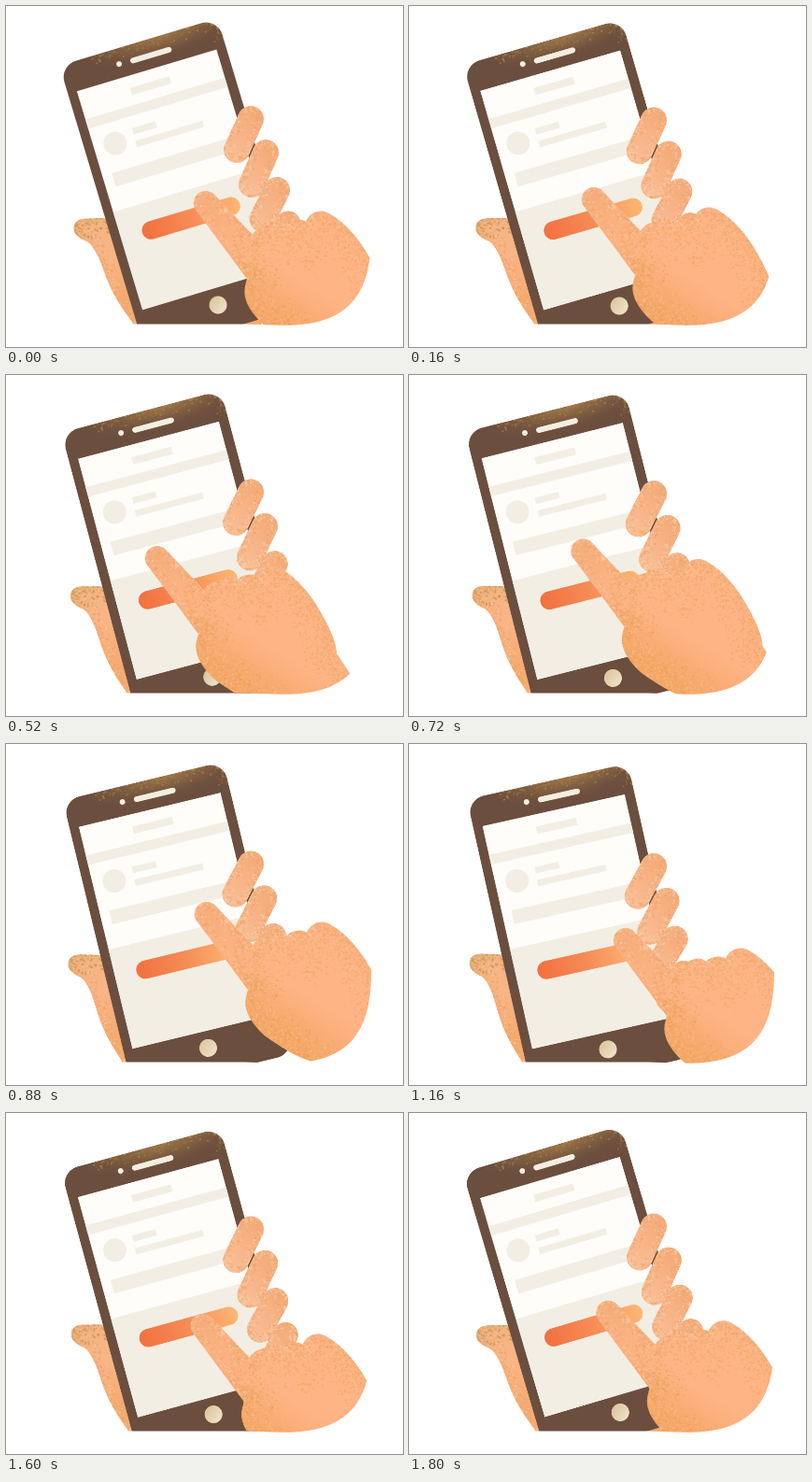
These frames come from a looping animation (425 px wide and 365 px high, 1840 ms). An HTML page with a canvas:

```html
<!DOCTYPE html>
<html lang="en">
<head>
<meta charset="utf-8">
<title>Tapping on a phone</title>
<style>
html, body { margin: 0; width: 100%; height: 100%; overflow: hidden; background: #fff; }
canvas { display: block; width: 425px; height: 365px; }
</style>
</head>
<body>
<canvas id="stage"></canvas>
<script>
const W = 425, H = 365, LOOP = 1840, STEP = 40;
const PIVOT = [124, 128], TILT = -16.7;
const RAD = Math.PI / 180;

const stage = document.getElementById('stage');
const dpr = Math.max(1, window.devicePixelRatio || 1);
stage.width = W * dpr;
stage.height = H * dpr;
const ctx = stage.getContext('2d');
const probe = document.createElement('canvas').getContext('2d');

let seed = 7;
function rand() {
  seed = (seed * 16807) % 2147483647;
  return seed / 2147483647;
}

// Off-screen picture whose top-left corner sits at (x, y)
function sprite(x, y, w, h, paint) {
  const c = document.createElement('canvas');
  const k = 2 * dpr;
  c.width = w * k;
  c.height = h * k;
  const g = c.getContext('2d');
  g.scale(k, k);
  g.translate(-x, -y);
  paint(g);
  return out => out.drawImage(c, x, y, w, h);
}

// Grain inside a path, denser towards its outline
function grain(g, path, [x, y, w, h], count, reach, colors, alpha = 0.75) {
  g.save();
  g.clip(path);
  for (let i = 0; i < count; i++) {
    const px = x + rand() * w, py = y + rand() * h;
    const near = rand(), size = 0.9 + rand() * 1.3;
    const color = colors[Math.floor(rand() * colors.length)];
    probe.lineWidth = 1 + 2 * reach * near * near;
    if (!probe.isPointInStroke(path, px, py)) continue;
    g.globalAlpha = alpha * (0.5 + rand() * 0.5);
    g.fillStyle = color;
    g.fillRect(px - size / 2, py - size / 2, size, size);
  }
  g.restore();
}

function blend(g, x0, y0, x1, y1, ...colors) {
  const grad = g.createLinearGradient(x0, y0, x1, y1);
  colors.forEach((c, i) => grad.addColorStop(i / (colors.length - 1), c));
  return grad;
}

function rounded(x, y, w, h, r) {
  const p = new Path2D();
  p.moveTo(x + r, y);
  p.arcTo(x + w, y, x + w, y + h, r);
  p.arcTo(x + w, y + h, x, y + h, r);
  p.arcTo(x, y + h, x, y, r);
  p.arcTo(x, y, x + w, y, r);
  p.closePath();
  return p;
}

function disc(g, x, y, r, fill) {
  g.fillStyle = fill;
  g.beginPath();
  g.arc(x, y, r, 0, 7);
  g.fill();
}

function bar(g, x, y, w, h, fill) {
  g.fillStyle = fill;
  g.fillRect(x, y, w, h);
}

function palm(g) {
  const p = new Path2D('M112 227 L87 227.5 C77 227 71.5 233 72.5 239 C73.5 246 81 250 87 252 ' +
    'C95 258 101 272 107 290 C114 308 124 324 135 338 L149 370 L272 370 L274 335 L240 300 L160 300 Z');
  g.fillStyle = blend(g, 76, 235, 130, 310, '#f2b582', '#fab486', '#f5ab70');
  g.fill(p);
  grain(g, p, [72, 225, 70, 115], 2600, 14, ['#e5a065', '#f9cba2', '#eda468']);
  grain(g, p, [72, 225, 42, 24], 500, 15, ['#cf9857', '#c08d4e', '#e6aa6e']);
}

function phone(g) {
  const paper = '#fffdfa', grey = '#f2eee4';
  g.save();
  g.translate(...PIVOT);
  g.rotate(TILT * RAD);

  const body = rounded(-45.5, -80.5, 176.5, 321.5, 18);
  g.fillStyle = '#6b4e3e';
  g.fill(body);
  g.save();
  g.clip(body);
  const glow = g.createRadialGradient(0, 0, 0, 0, 0, 1);
  glow.addColorStop(0, 'rgba(186,142,82,.85)');
  glow.addColorStop(0.5, 'rgba(150,112,68,.45)');
  glow.addColorStop(1, 'rgba(107,78,62,0)');
  g.translate(66, -84);
  g.scale(98, 31);
  disc(g, 0, 0, 1, glow);
  g.restore();
  grain(g, body, [-10, -81, 142, 26], 1300, 12, ['#b98c50', '#94703f', '#85623f'], 0.6);
  grain(g, body, [-46, 120, 12, 120], 160, 4, ['#876650', '#5d4335'], 0.4);

  disc(g, 16.1, -64, 3, '#f4eee1');
  g.fillStyle = '#f4eee1';
  g.fill(rounded(28.5, -66.3, 46, 6, 3));

  bar(g, -35.5, -49, 156, 244.3, paper);
  bar(g, 20, -36, 44, 8, grey);
  bar(g, -35.5, -17.5, 156, 10.5, grey);
  disc(g, -12.2, 16.2, 12.5, grey);
  bar(g, 9.5, 5.8, 26, 7, grey);
  bar(g, 9, 19.8, 75, 7, grey);
  bar(g, -25, 45.7, 137, 15, grey);
  bar(g, -35.5, 86, 156, 109.3, grey);
  g.fillStyle = blend(g, -12, 0, 97, 0, '#f2703f', '#f68c57', '#fdb873');
  g.fill(rounded(-12, 106.5, 109, 19.5, 9.75));
  disc(g, 43.5, 213.5, 9.5, blend(g, 38, 206, 50, 222, '#dcc79f', '#efe3c9'));
  g.restore();
}

function finger(g, x0, y0, x1, y1, r) {
  const a = Math.atan2(y1 - y0, x1 - x0), q = Math.PI / 2;
  const p = new Path2D();
  p.arc(x0, y0, r, a + q, a - q);
  p.arc(x1, y1, r, a - q, a + q);
  p.closePath();
  g.fillStyle = blend(g, x0 + 10, y0, x1 - 10, y1, '#f3ab78', '#f8b386', '#f8bd94');
  g.fill(p);
  const box = [x1 - r, y0 - r, x0 - x1 + 2 * r, y1 - y0 + 2 * r];
  grain(g, p, box, 1500, 11, ['#eb9f68', '#fcd3b0', '#f0a976', '#fac8a0']);
}

const device = sprite(0, 0, W, 400, g => {
  palm(g);
  phone(g);
  finger(g, 302, 233, 288, 262, 13.5);
  finger(g, 290, 197, 274.5, 228, 14);
  finger(g, 278, 157, 263, 191, 14);
  finger(g, 262, 121, 247, 154, 14);
});

// Pointing hand, with the centre of its fingertip at the origin
const hand = sprite(-20, -20, 300, 230, g => {
  const p = new Path2D('M-10 8 C-15 1 -11 -11 0 -12 C6 -12 10 -9 13 -5 L51 35 ' +
    'C54 29 60 26 67 25 C73 20 82 19 87 24 C92 18 104 17 108 21 C112 11 124 5 136 14 ' +
    'C150 22 165 40 173 54 C185 74 193 92 193 103 L207 124 L270 200 L150 200 L111 158 ' +
    'C95 153 80 143 64 132 C48 118 40 103 43 90 L45 82 Z');
  g.fillStyle = blend(g, 58, 140, 94, 80, '#f2a35c', '#f8ab70', '#ffb486');
  g.fill(p);
  const tip = g.createRadialGradient(0, 0, 2, 0, 0, 75);
  tip.addColorStop(0, 'rgba(243,172,120,.8)');
  tip.addColorStop(1, 'rgba(248,174,124,0)');
  g.fillStyle = tip;
  g.fill(p);
  grain(g, p, [30, 5, 185, 165], 20000, 38, ['#f0a564', '#f4ab6e', '#f9bd8d']);
  grain(g, p, [38, 60, 75, 100], 2600, 38, ['#ea9b52', '#f0a55e', '#f6b47c']);
  grain(g, p, [-13, -13, 165, 95], 6500, 13, ['#fbcda8', '#f0a06a', '#f7bd93']);
});

// time, x, y of the fingertip
const path = [
  [0, 213, 210], [320, 181, 202], [560, 157, 193.7], [880, 214, 181],
  [1160, 231, 209], [1400, 207, 241], [LOOP, 213, 210]
];
const swing = [[0, 0], [1160, 4.1], [LOOP, 0]];

function at(keys, t) {
  const i = keys.findIndex(k => k[0] > t);
  const a = keys[i - 1], b = keys[i];
  const f = (t - a[0]) / (b[0] - a[0]);
  return a.slice(1).map((v, n) => v + (b[n + 1] - v) * f);
}

const mask = new Path2D('M0 0 H391 V240 C392 311 366 342.5 295 341.8 L255 340.6 H0 Z');

function draw(t) {
  ctx.setTransform(dpr, 0, 0, dpr, 0, 0);
  ctx.fillStyle = '#fff';
  ctx.fillRect(0, 0, W, H);
  ctx.save();
  ctx.clip(mask);

  ctx.save();
  ctx.translate(...PIVOT);
  ctx.rotate(at(swing, t)[0] * RAD);
  ctx.translate(-PIVOT[0], -PIVOT[1]);
  device(ctx);
  ctx.restore();

  ctx.translate(...at(path, t));
  hand(ctx);
  ctx.restore();
}

const start = performance.now();
function tick() {
  const t = (performance.now() - start) % LOOP;
  draw(Math.floor(t / STEP) * STEP);
  requestAnimationFrame(tick);
}
tick();
</script>
</body>
</html>
```
